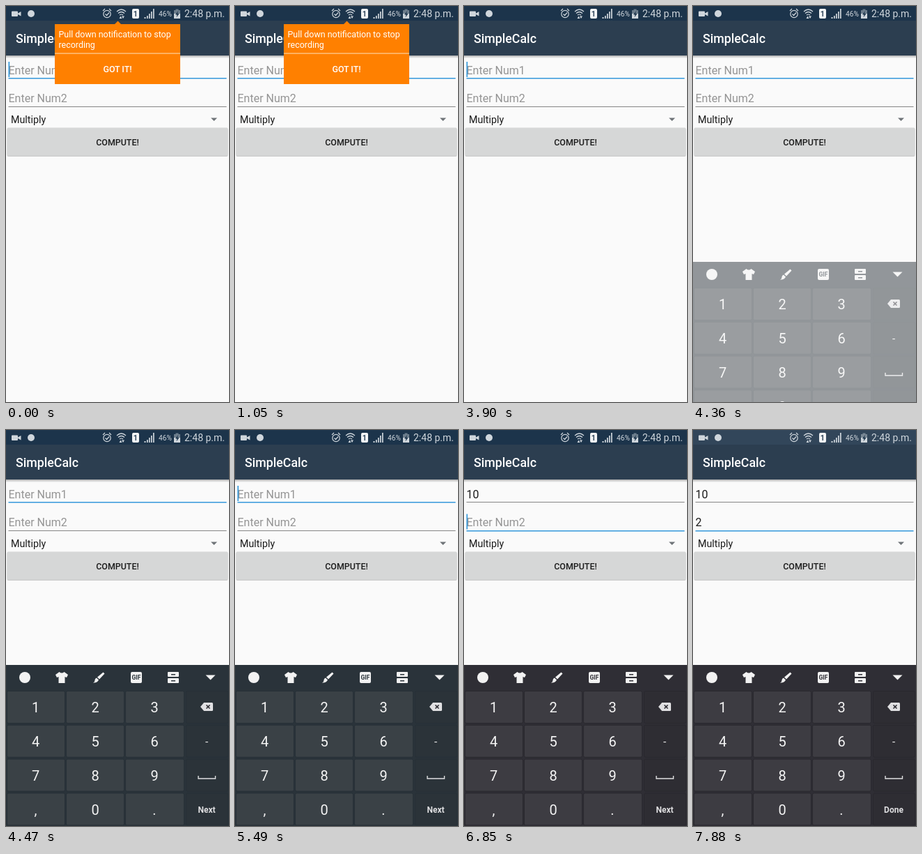
An HTML page for the animation above (8000 ms loop, 320 by 568 pixels).

```html
<!DOCTYPE html>
<html lang="en">
<head>
<meta charset="utf-8">
<title>SimpleCalc</title>
<style>
html, body { margin: 0; width: 100%; height: 100%; overflow: hidden; background: #fafafa; }
svg { display: block; width: 100vw; height: 100vh; font-family: Roboto, sans-serif; }

/* Every change is a hard cut on one shared 8 s clock: 1% = 80 ms. */
.anim { animation: 8s step-end infinite; }
.medium { font-weight: 500; }
.mid { text-anchor: middle; }
.hint { fill: #949494; }
.value { fill: #1c1c1c; }
.field { font-size: 16px; }
.idle { fill: #858585; }
.focus { fill: #3498db; }

#bar { animation-name: bar; }
@keyframes bar { 0% { fill: #1c344b } 97%, 100% { fill: #32465a } }

#toast { animation-name: toast; }
@keyframes toast { 0% { opacity: 1 } 38.625%, 100% { opacity: 0 } }

#cursor { animation-name: cursor; }
@keyframes cursor {
  0%, 6.625%, 18.875%, 31.5%, 38.625%, 48.75%, 57.125%, 68.625% { opacity: 1; transform: none }
  1.25%, 13.125%, 25.125%, 37.375%, 46.375%, 54.5%, 62.5% { opacity: 0; transform: none }
  74.875% { opacity: 1; transform: translate(9px, 0) }
  76.25% { opacity: 1; transform: translate(17px, 0) }
  82% { opacity: 0; transform: translate(17px, 0) }
  85.625% { opacity: 1; transform: translate(0, 40.5px) }
  93% { opacity: 1; transform: translate(9px, 40.5px) }
  98.5%, 100% { opacity: 0; transform: translate(9px, 40.5px) }
}

#hint1 { animation-name: untilFirst; }
#digit1 { animation-name: fromFirst; }
#digit0 { animation-name: fromSecond; }
#hint2 { animation-name: untilThird; }
#digit2 { animation-name: fromThird; }
@keyframes untilFirst { 0% { opacity: 1 } 74.875%, 100% { opacity: 0 } }
@keyframes fromFirst { 0% { opacity: 0 } 74.875%, 100% { opacity: 1 } }
@keyframes fromSecond { 0% { opacity: 0 } 76.25%, 100% { opacity: 1 } }
@keyframes untilThird { 0% { opacity: 1 } 93%, 100% { opacity: 0 } }
@keyframes fromThird { 0% { opacity: 0 } 93%, 100% { opacity: 1 } }

.onFirst { animation-name: onFirst; }
.onSecond { animation-name: onSecond; }
@keyframes onFirst { 0% { opacity: 1 } 85.625%, 100% { opacity: 0 } }
@keyframes onSecond { 0% { opacity: 0 } 85.625%, 100% { opacity: 1 } }

#keyboard { animation-name: rise, tone; }
@keyframes rise {
  0% { opacity: 0; transform: translate(0, 30px) }
  54.5% { opacity: .5; transform: translate(0, 30px) }
  55.875%, 100% { opacity: 1; transform: none }
}
@keyframes tone {
  0% { --panel: #2a333a; --key: #3a4146; --side: #2b3339; --edge: #273037 }
  74.875%, 100% { --panel: #2f2e35; --key: #3d3c42; --side: #2e2d33; --edge: #29282e }
}
.panel { fill: var(--panel); }
.key { fill: var(--key); stroke: var(--edge); }
.side { fill: var(--side); stroke: var(--edge); }
.lit { fill: #fff; fill-opacity: .14; }
#lit1 { animation-name: lit1; }
#lit0 { animation-name: lit0; }
#lit2 { animation-name: lit2; }
@keyframes lit1 { 0%, 76.25%, 100% { opacity: 0 } 74.875% { opacity: 1 } }
@keyframes lit0 { 0%, 77.625%, 100% { opacity: 0 } 76.25% { opacity: 1 } }
@keyframes lit2 { 0%, 94.25%, 100% { opacity: 0 } 93% { opacity: 1 } }
#next { animation-name: next; }
#done { animation-name: done; }
@keyframes next { 0% { opacity: 1 } 87.75%, 100% { opacity: 0 } }
@keyframes done { 0% { opacity: 0 } 87.75%, 100% { opacity: 1 } }
</style>
</head>
<body>
<svg viewBox="0 0 320 568">
  <defs>
    <linearGradient id="shade" x2="0" y2="1">
      <stop stop-color="#000" stop-opacity=".3"/><stop offset="1" stop-color="#000" stop-opacity="0"/>
    </linearGradient>
    <g id="row">
      <rect class="key" x="1.5" y="374.500" width="83" height="46" rx="2"/>
      <rect class="key" x="86.500" y="374.500" width="83" height="46" rx="2"/>
      <rect class="key" x="171.500" y="374.500" width="84" height="46" rx="2"/>
      <rect class="side" x="258.500" y="374.500" width="60" height="46" rx="2"/>
    </g>
  </defs>

  <rect width="320" height="568" fill="#fafafa"/>
  <rect y="71" width="320" height="4" fill="url(#shade)"/>
  <rect width="320" height="71" fill="#2c3e50"/>
  <rect id="bar" class="anim" width="320" height="21"/>

  <g id="status" fill="#cfd6dc">
    <path d="M8 8.500q0-1 1-1h7q1 0 1 1v2l4.500-2.500v6.500l-4.500-2.500v2q0 1-1 1h-7q-1 0-1-1z"/>
    <circle cx="36" cy="11" r="5"/>
    <g fill="none" stroke="#cfd6dc" stroke-width="1.2">
      <circle cx="145" cy="11.500" r="5.200"/>
      <path d="M139 7l3-3M151 7l-3-3M142.500 11.500l2 2 3.500-4"/>
      <path d="M159 8q6.500-6 13 0M161 10.500q4.500-4 9 0M163 13q2.500-2 5 0"/>
    </g>
    <path d="M162.500 18l2-3.500 2 3.500zM166 14.500h4l-2 3.500z"/>
    <rect x="181" y="4" width="10" height="14" rx="2" fill="#f2f4f5"/>
    <path d="M198.500 18v-2h2v2zM202 18v-4h1.700v4zM205 18v-7h1.700v7zM208 18v-10h1.700v10zM211 18v-14h1.700v14z"/>
    <path d="M243.500 6v-1.500h4v1.500h2.500v5h-9v-5z" opacity=".45"/>
    <path d="M241 11h9v7h-9z"/>
    <path d="M247 7l-4 5.500h2.500l-1 4 4-5.500h-2.500z" fill="#1c344b"/>
    <text class="mid medium" x="186" y="15" font-size="11" fill="#1c344b">1</text>
    <text x="219" y="15" font-size="10.200">46%</text>
    <text x="256" y="16" font-size="14">2:48 p.m.</text>
  </g>
  <text class="medium" x="14" y="53" font-size="17.800" fill="#fff">SimpleCalc</text>

  <g class="field">
    <text id="hint1" class="anim hint" x="3.500" y="97.500">Enter Num1</text>
    <text id="digit1" class="anim value" x="3.500" y="97.500">1</text>
    <text id="digit0" class="anim value" x="12.500" y="97.500">0</text>
    <text id="hint2" class="anim hint" x="3.500" y="138">Enter Num2</text>
    <text id="digit2" class="anim value" x="3.500" y="138">2</text>
  </g>
  <rect class="anim onFirst focus" x="3.500" y="103" width="313" height="1.500"/>
  <rect class="anim onSecond idle" x="3.500" y="103" width="313" height="1"/>
  <rect class="anim onFirst idle" x="3.500" y="144" width="313" height="1"/>
  <rect class="anim onSecond focus" x="3.500" y="144" width="313" height="1.500"/>
  <rect id="cursor" class="anim focus" x="3.500" y="80" width="1.700" height="22"/>

  <text class="value" x="7" y="168" font-size="14.300">Multiply</text>
  <path d="M294 160.500h9l-4.500 4.500z" fill="#6f7478"/>
  <rect x="1.500" y="175.500" width="317" height="40.500" rx="2" fill="#000" opacity=".18"/>
  <rect x="1.500" y="174.500" width="317" height="40" rx="2" fill="#d6d7d7"/>
  <text class="mid medium value" x="160" y="199.500" font-size="12.440">COMPUTE!</text>

  <g id="toast" class="anim" fill="#fff" font-size="12.440">
    <path d="M70 26h86l4.500-4.500 4.500 4.500h85v86h-180z" fill="#ff8000"/>
    <text x="75.500" y="45">Pull down notification to stop</text>
    <text x="75.500" y="59.500">recording</text>
    <rect x="70" y="67.500" width="180" height="1" fill="#ffe0bd"/>
    <text class="mid medium" x="160" y="94.500">GOT IT!</text>
  </g>

  <g id="keyboard" class="anim">
    <rect class="panel" y="337" width="320" height="231"/>
    <g fill="#f2f2f2">
      <circle cx="27" cy="355" r="8"/>
      <path d="M76.500 347q3.500 3 7 0l5.500 4-2 4-2.500-1v9h-9v-9l-2.500 1-2-4z"/>
      <path d="M139.500 347.500l2 2-7.500 8-3-3zM130 355.500l3 3q-2 4.500-8 4 3-2 2.500-4 .5-2.500 2.500-3z"/>
      <rect x="179" y="347" width="16" height="16" rx="2"/>
      <rect x="232" y="347" width="16" height="7" rx="1"/>
      <rect x="232" y="356" width="16" height="7" rx="1"/>
      <path d="M286.500 351.500h14l-7 7z"/>
    </g>
    <path class="panel" d="M237 350h6v1.500h-6zM237 359h6v1.500h-6z"/>
    <text class="panel mid" x="187" y="358.300" font-size="8.500" font-weight="700">GIF</text>

    <use href="#row"/>
    <use href="#row" y="48.800"/>
    <use href="#row" y="97.600"/>
    <use href="#row" y="146.400"/>
    <rect id="lit1" class="anim lit" x="1.500" y="374.500" width="83" height="46" rx="2"/>
    <rect id="lit2" class="anim lit" x="86.500" y="374.500" width="83" height="46" rx="2"/>
    <rect id="lit0" class="anim lit" x="86.500" y="520.900" width="83" height="46" rx="2"/>

    <g class="mid" fill="#f4f4f4" font-size="20">
      <text x="42.500 128 213" y="405">123</text>
      <text x="42.500 128 213" y="454">456</text>
      <text x="42.500 128 213" y="502.500">789</text>
      <text x="42.500 128 213" y="551.500">,0.</text>
      <text x="288" y="452" font-size="15">-</text>
      <g font-size="12" font-weight="700" fill="#dedee0">
        <text id="next" class="anim" x="288" y="548.500">Next</text>
        <text id="done" class="anim" x="288" y="548.500">Done</text>
      </g>
    </g>
    <path d="M279 397l5-6h11.500q1.500 0 1.500 1.500v9q0 1.500-1.500 1.500h-11.500z" fill="#e0e0e2"/>
    <path d="M287.500 394.500l5 5M292.500 394.500l-5 5" stroke="#2a2930" stroke-width="1.600"/>
    <path d="M276 496v4h24.500v-4" fill="none" stroke="#e0e0e2" stroke-width="1.400"/>
  </g>
</svg>
</body>
</html>
```
